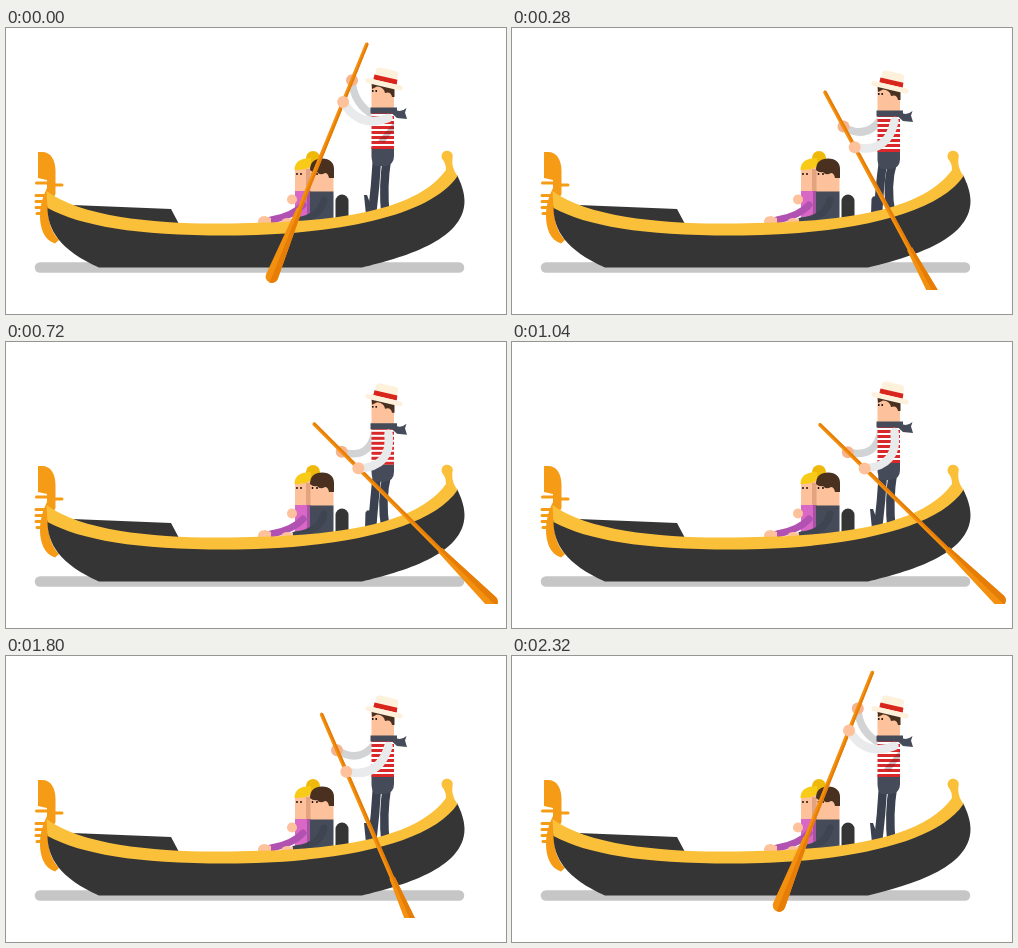
An HTML page that plays this animation: 500 by 286 pixels, repeating every 2.36 s.

```html
<!DOCTYPE html>
<html lang="en">
<head>
<meta charset="utf-8">
<title>Gondola</title>
<style>
  html, body { margin: 0; width: 100%; height: 100%; overflow: hidden; background: #fff; }
  svg { display: block; width: 100%; height: 100%; }
  .skin { fill: #fdc19b; }
  .hair { fill: #49301f; }
  .slate { fill: #454b58; }
  .dark { fill: #353535; }
  .orange { fill: #f59b16; }
  .gold { fill: #fbc03a; }
  .line { fill: none; stroke-linecap: round; }
</style>
</head>
<body>
<svg viewBox="0 0 500 286">
  <defs>
    <clipPath id="cut"><rect width="500" height="262"/></clipPath>
    <pattern id="stripes" width="40" height="5" y="83" patternUnits="userSpaceOnUse">
      <rect width="40" height="5" fill="#fff"/>
      <rect width="40" height="3" fill="#d9292b"/>
    </pattern>
  </defs>

  <path class="line" d="M34 239.5H453" stroke="#c6c6c6" stroke-width="10.500"/>

  <!-- bow -->
  <path class="orange" d="M32 124H36C45 124 49.500 132 49.500 143V166L42 180C42 194 46 205 53 212L49 215.500C38 212 34 200 34 188C34 176 38 166 41 160V152L32 150Z"/>
  <path class="line" d="M30.500 155H42M46 157H56M30 167.500H39M30 173.500H38M30 179.500H37M31 185.500H37" stroke="#f59b16" stroke-width="3"/>
  <path class="dark" d="M66 177L165 181L173 196L110 194Z"/>

  <!-- seat and passengers -->
  <rect class="dark" x="329.500" y="166.500" width="13" height="30" rx="6.500"/>
  <g>
    <circle cx="307" cy="130" r="7" fill="#efb90c"/>
    <rect class="skin" x="289" y="139" width="16" height="25"/>
    <rect x="300" y="141" width="5" height="23" fill="#e3a37e"/>
    <path d="M288.500 142C288.500 134 294 130 305 130V138C302 141 296 142 288.500 142Z" fill="#f8cb18"/>
    <rect x="289" y="163" width="16" height="34" fill="#d867c6"/>
    <rect x="301" y="163" width="4" height="34" fill="#a653a4"/>
    <path class="line" d="M297 177Q287 188 265 192" stroke="#b151b2" stroke-width="7"/>
    <circle class="skin" cx="286" cy="171.500" r="5"/>
    <path class="skin" d="M252 197V193Q253 188 259 188L265 190V197Z"/>
    <circle cx="291" cy="146" r=".9"/><circle cx="295" cy="146" r=".9"/>
  </g>
  <g>
    <rect class="skin" x="304.500" y="142" width="23" height="22"/>
    <path class="hair" d="M304 142C304 134 309 130.500 316 130.500C324 130.500 328 135 328 141V150H323Q322 145 319 145Q314 148 311 144Q307 145 304 142Z"/>
    <circle cx="306.500" cy="146" r=".9"/><circle cx="311" cy="146" r=".9"/>
    <rect class="slate" x="304" y="163.500" width="23.500" height="34"/>
    <path class="line" d="M318 172Q314 190 289 193" stroke="#3f4451" stroke-width="7"/>
    <path class="skin" d="M274 197Q275 190 281 190L287 191V197Z"/>
  </g>

  <!-- gondolier -->
  <g class="line" stroke="#3b414e" stroke-width="8.500">
    <path id="farLeg"/><path id="nearLeg"/>
  </g>
  <polygon id="boot" fill="#3b414e"/>
  <g class="torso">
    <path class="slate" d="M365.500 119H388V128Q388 137 379 138H369Q365.500 134 365.500 128Z"/>
  </g>
  <path id="farArm" class="line" stroke="#d2d3d5" stroke-width="7.500"/>
  <g class="torso">
    <rect x="365.500" y="84" width="22.500" height="37" fill="url(#stripes)"/>
    <path id="shade" d="M372 113L388 94V102L378 115Z" fill="#5a1a20"/>
    <rect class="skin" x="365.500" y="56" width="22.500" height="25"/>
    <path class="hair" d="M365.500 54L388.500 57V69H386Q385 63 379 65Q378 59 371 58.500L366 61Z"/>
    <circle cx="366.800" cy="63" r=".9"/><circle cx="370.200" cy="63" r=".9"/>
    <path class="slate" d="M364.500 79.500H391V82.500Q396 84 400.500 80L399 84.500L401 91L391 90L386 85.500H364.500Z"/>
    <g transform="translate(378 56.300) rotate(13)">
      <path d="M-10.500 0L-11-13Q-10.500-15.500-7-15.500H8Q11-15.500 11.500-13L12.500 0Z" fill="#fdf1dc"/>
      <path d="M-11.500-7.500H12L12.500-2.500H-11.500Z" fill="#d9261d"/>
      <rect x="-19" y="-2.500" width="38" height="5" rx="2.500" fill="#fdf1dc"/>
    </g>
  </g>

  <!-- hull -->
  <path class="dark" d="M41.500 178C41 202 54 222 93 239.500H356C395 230 458.500 213 458.500 173C458.500 164 455 155 451 147C425 187 330 206 220 206C130 206 75 196 41.500 178Z"/>
  <path class="gold" d="M40.500 163C75 189 150 196 215 195.500C320 195 408 186 440 142Q440 136 437 132A5.600 5.600 0 1 1 446.500 130Q445 139 451.500 148C425 188 330 207.500 220 207.500C130 207.500 75 198 41.500 180Z"/>

  <!-- oar -->
  <circle id="farHand" r="6" fill="#f5b48e"/>
  <g clip-path="url(#cut)">
    <g id="oar">
      <path d="M-1.800 1.500Q0-1 1.800 1.500L2.200 180H2.900L6.300 253A6.300 6.300 0 0 1-6.300 253L-2.900 180H-2.200Z" fill="#f4900f"/>
      <path d="M0 0L1.800 1.500L2.200 180H2.900L6.300 253A6.300 6.300 0 0 1 0 259.300Z" fill="#e67d06"/>
    </g>
  </g>
  <path id="nearArm" class="line" stroke="#e9eaeb" stroke-width="8.500"/>
  <circle id="nearHand" class="skin" r="6"/>
</svg>
<script>
const LOOP = 2360, STEP = 40;
const $ = id => document.getElementById(id);
const torso = document.querySelectorAll('.torso');
const mix = (a, b, k) => a + (b - a) * k;

// Smooth monotone curve through [x, y] points
function curve(points, flatEnds) {
  const n = points.length - 1;
  const sec = [];
  for (let i = 0; i < n; i++)
    sec.push((points[i + 1][1] - points[i][1]) / (points[i + 1][0] - points[i][0]));
  const slope = points.map((_, i) => {
    if (i === 0 || i === n) return flatEnds ? 0 : sec[i ? n - 1 : 0];
    const a = sec[i - 1], b = sec[i];
    return a * b > 0 ? 2 * a * b / (a + b) : 0;
  });
  return x => {
    let i = 0;
    while (i < n - 1 && x > points[i + 1][0]) i++;
    const [x0, y0] = points[i], [x1, y1] = points[i + 1];
    const h = x1 - x0, u = (x - x0) / h, v = 1 - u;
    return y0 * v * v * (1 + 2 * u) + y1 * u * u * (3 - 2 * u)
      + h * u * v * (slope[i] * v - slope[i + 1] * u);
  };
}

// Oar angle and body dip over time
const angleAt = curve([[0, -22.2], [280, 28.4], [560, 43.1], [720, 45], [1040, 45.7],
  [1400, 45.7], [1600, 45], [1680, 39], [2000, -4.3], [2240, -20.8], [2320, -21.8], [2360, -22.2]], true);
const dipAt = curve([[0, 0], [280, 1], [720, .6], [1040, 0], [2360, 0]], true);

// Everything the oar carries depends on its angle
const byAngle = (...v) => curve([-22.2, -4.3, 28.4, 45.7].map((a, i) => [a, v[i]]));
const topX = byAngle(361.5, 339.5, 312, 306.5);
const topY = byAngle(14.3, 25, 62.5, 81.5);
const nearBend = byAngle(20, 15, 24, 25);
const farBend = byAngle(12, 14, 18, 22);

function arm(id, sx, sy, [x, y], bend) {
  const dx = x - sx, dy = y - sy, len = Math.hypot(dx, dy);
  const cx = (x + sx) / 2 + dy / len * bend, cy = (y + sy) / 2 - dx / len * bend;
  $(id + 'Arm').setAttribute('d', `M${sx} ${sy}Q${cx} ${cy} ${x} ${y}`);
  $(id + 'Hand').setAttribute('transform', `translate(${x} ${y})`);
}

const bootUp = [358, 167, 361, 167, 364, 175, 369, 170, 369, 187, 360, 187];
const bootFlat = [359.5, 171, 361, 168.5, 366, 168, 370, 168, 369.5, 187, 359, 187];

function draw(t) {
  const a = angleAt(t), dip = dipAt(t), drop = 3 * dip;
  const rad = a * Math.PI / 180, x = topX(a), y = topY(a);
  const grip = d => [x + d * Math.sin(rad), y + d * Math.cos(rad)];

  $('oar').setAttribute('transform', `translate(${x} ${y}) rotate(${-a})`);
  arm('far', 369, 88 + drop, grip(41), farBend(a));
  arm('near', 382.5, 90 + drop, grip(64.5), nearBend(a));

  torso.forEach(g => g.setAttribute('transform', `translate(0 ${drop})`));
  $('shade').setAttribute('opacity', Math.max(0, Math.min(.3, (20 - a) / 60)));
  const hip = 131 + drop;
  $('farLeg').setAttribute('d', `M371 ${hip}Q${369.5 - 2 * dip} 158 366 187`);
  $('nearLeg').setAttribute('d', `M381 ${hip}Q${376.5 - 3 * dip} 158 379.5 187`);
  const k = Math.min(1, dip * 1.6);
  $('boot').setAttribute('points', bootUp.map((v, i) => mix(v, bootFlat[i], k)).join(' '));
}

let start;
function tick(now) {
  start ??= now;
  const t = Math.max(0, now - start) % LOOP;
  draw(Math.floor(t / STEP) * STEP);
  requestAnimationFrame(tick);
}
draw(0);
requestAnimationFrame(tick);
</script>
</body>
</html>
```
